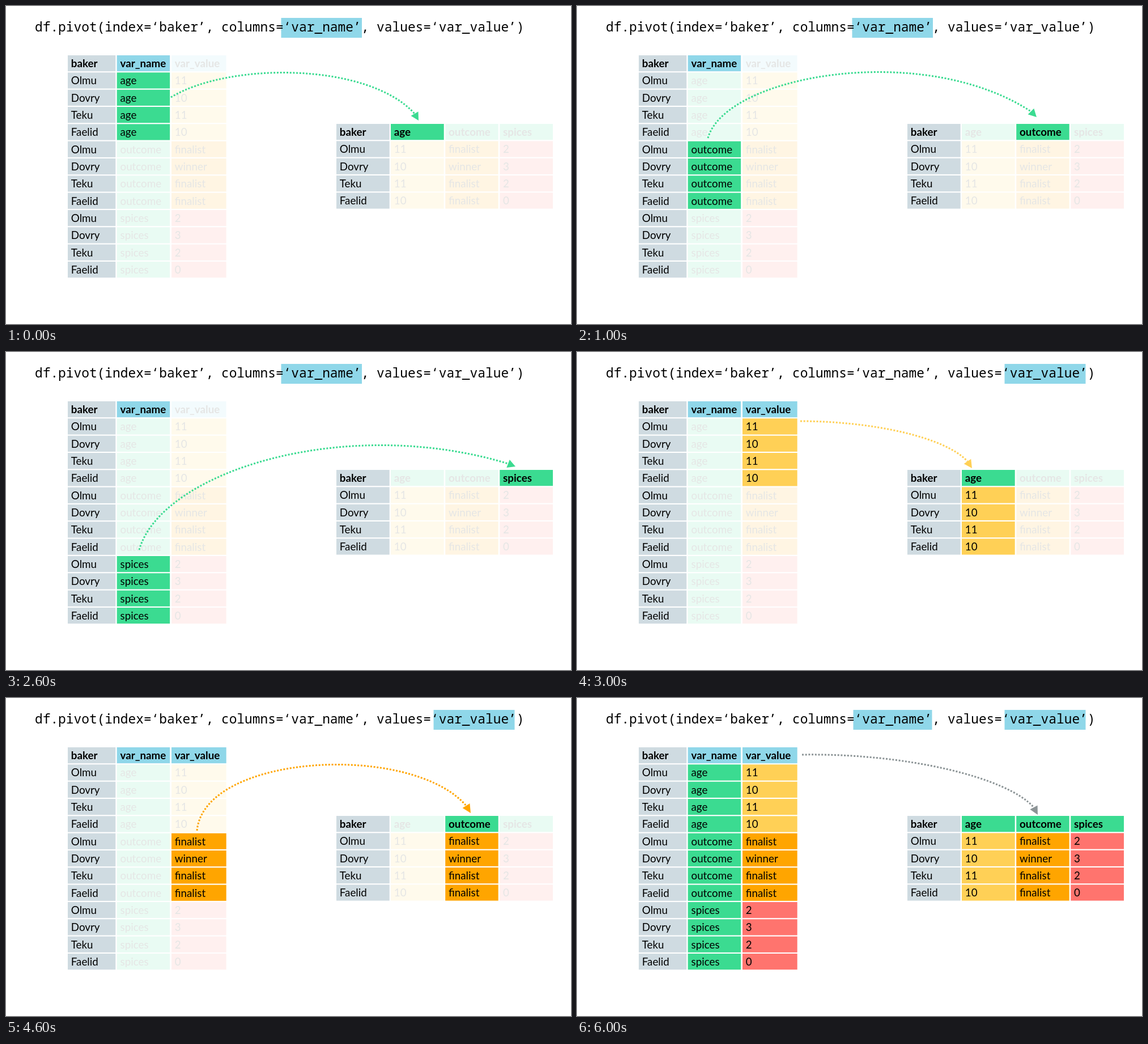
These frames come from a looping animation (997 px wide and 561 px high, 7 s). An HTML page with a canvas:

```html
<!DOCTYPE html>
<html lang="en">
<head>
<meta charset="utf-8">
<title>Pivoting a table</title>
<style>
  html, body { margin: 0; width: 100%; height: 100%; overflow: hidden; background: #fff; }
  canvas { display: block; }
</style>
</head>
<body>
<canvas id="stage" width="997" height="561"></canvas>
<script>
const ctx = document.getElementById('stage').getContext('2d');
const STEP_MS = 1000;
const ROW_PITCH = 30.33, ROW_HEIGHT = 28.2;

const GREY = '#cfdbe1', BLUE = '#8fd7e9', GREEN = '#3bdb91';
const GROUP_COLORS = ['#ffd056', '#ffa500', '#ff746e'];

const bakers = ['Olmu', 'Dovry', 'Teku', 'Faelid'];
const variables = ['age', 'outcome', 'spices'];
const values = [
  ['11', '10', '11', '10'],
  ['finalist', 'winner', 'finalist', 'finalist'],
  ['2', '3', '2', '0']
];

// Columns as [left, width].
const longTable = { top: 87, columns: [[109, 84.3], [195.7, 93.5], [292, 96.7]] };
const wideTable = { top: 208, columns: [[583, 93.7], [679, 93.7], [775.2, 93.5], [871.3, 93.7]] };

const nameMark = [485.5, 142.5], valueMark = [754.5, 143];

// Each step: the lit group, what is lit, the marked argument, and the arrow.
// Arrow: cubic curve points followed by the tip.
const steps = [
  { group: 0, names: true, marks: [nameMark], color: GREEN,
    arrow: [291, 161, 395, 98, 640, 100, 721, 190, 728, 202] },
  { group: 1, names: true, marks: [nameMark], color: GREEN,
    arrow: [231, 233, 262, 122, 610, 61, 801, 186, 811, 196] },
  { group: 2, names: true, marks: [nameMark], color: GREEN,
    arrow: [235, 349, 275, 210, 600, 110, 886, 197, 899, 202] },
  { group: 0, values: true, marks: [valueMark], color: GROUP_COLORS[0],
    arrow: [394, 122, 520, 122, 650, 150, 689, 193, 697, 205] },
  { group: 1, values: true, marks: [valueMark], color: GROUP_COLORS[1],
    arrow: [337, 234, 350, 98, 715, 78, 812, 190, 820, 203] },
  { group: 2, values: true, marks: [valueMark], color: '#f0706b',
    arrow: [324, 356, 360, 192, 650, 54, 897, 198, 909, 205] },
  { all: true, names: true, values: true, marks: [[487.5, 139], valueMark], color: '#8c9496',
    arrow: [397, 100, 580, 97, 760, 140, 806, 193, 813, 206] }
];

function drawCell(table, column, row, text, color, lit) {
  const [x, width] = table.columns[column];
  const y = table.top + row * ROW_PITCH;
  ctx.globalAlpha = lit ? 1 : 0.11;
  ctx.fillStyle = color;
  ctx.fillRect(x, y, width, ROW_HEIGHT);
  ctx.globalAlpha = 1;
  ctx.fillStyle = lit ? '#000' : '#e5e6e5';
  ctx.font = `${row ? 400 : 700} 18.8px Lato, sans-serif`;
  ctx.fillText(text, x + 5.8, y + 21);
}

function drawCode(marks) {
  ctx.fillStyle = BLUE;
  for (const [x, width] of marks) ctx.fillRect(x, 21, width, 35);
  ctx.fillStyle = '#000';
  ctx.font = '400 22.85px "Noto Sans Mono", monospace';
  ctx.fillText('df.pivot(index=‘baker’, columns=‘var_name’, values=‘var_value’)', 51, 45);
}

function drawLongTable(step) {
  drawCell(longTable, 0, 0, 'baker', GREY, true);
  drawCell(longTable, 1, 0, 'var_name', BLUE, true);
  drawCell(longTable, 2, 0, 'var_value', BLUE, step.values);
  variables.forEach((variable, group) => {
    const active = step.all || step.group === group;
    bakers.forEach((baker, i) => {
      const row = 1 + group * bakers.length + i;
      drawCell(longTable, 0, row, baker, GREY, true);
      drawCell(longTable, 1, row, variable, GREEN, active && step.names);
      drawCell(longTable, 2, row, values[group][i], GROUP_COLORS[group], active && step.values);
    });
  });
}

function drawWideTable(step) {
  drawCell(wideTable, 0, 0, 'baker', GREY, true);
  bakers.forEach((baker, i) => drawCell(wideTable, 0, i + 1, baker, GREY, true));
  variables.forEach((variable, group) => {
    const active = step.all || step.group === group;
    drawCell(wideTable, group + 1, 0, variable, GREEN, active);
    bakers.forEach((_, i) =>
      drawCell(wideTable, group + 1, i + 1, values[group][i], GROUP_COLORS[group], active && step.values));
  });
}

function drawArrow([x0, y0, x1, y1, x2, y2, baseX, baseY, tipX, tipY], color) {
  ctx.strokeStyle = ctx.fillStyle = color;
  ctx.lineWidth = 3;
  ctx.setLineDash([3, 2.7]);
  ctx.beginPath();
  ctx.moveTo(x0, y0);
  ctx.bezierCurveTo(x1, y1, x2, y2, baseX, baseY);
  ctx.stroke();

  const length = Math.hypot(tipX - baseX, tipY - baseY);
  const sideX = -(tipY - baseY) / length * 7.5;
  const sideY = (tipX - baseX) / length * 7.5;
  ctx.beginPath();
  ctx.moveTo(tipX, tipY);
  ctx.lineTo(baseX + sideX, baseY + sideY);
  ctx.lineTo(baseX - sideX, baseY - sideY);
  ctx.fill();
}

function render(now) {
  const step = steps[Math.floor(now / STEP_MS) % steps.length];
  ctx.fillStyle = '#fff';
  ctx.fillRect(0, 0, 997, 561);
  drawCode(step.marks);
  drawLongTable(step);
  drawWideTable(step);
  drawArrow(step.arrow, step.color);
  requestAnimationFrame(render);
}

requestAnimationFrame(render);
</script>
</body>
</html>
```
